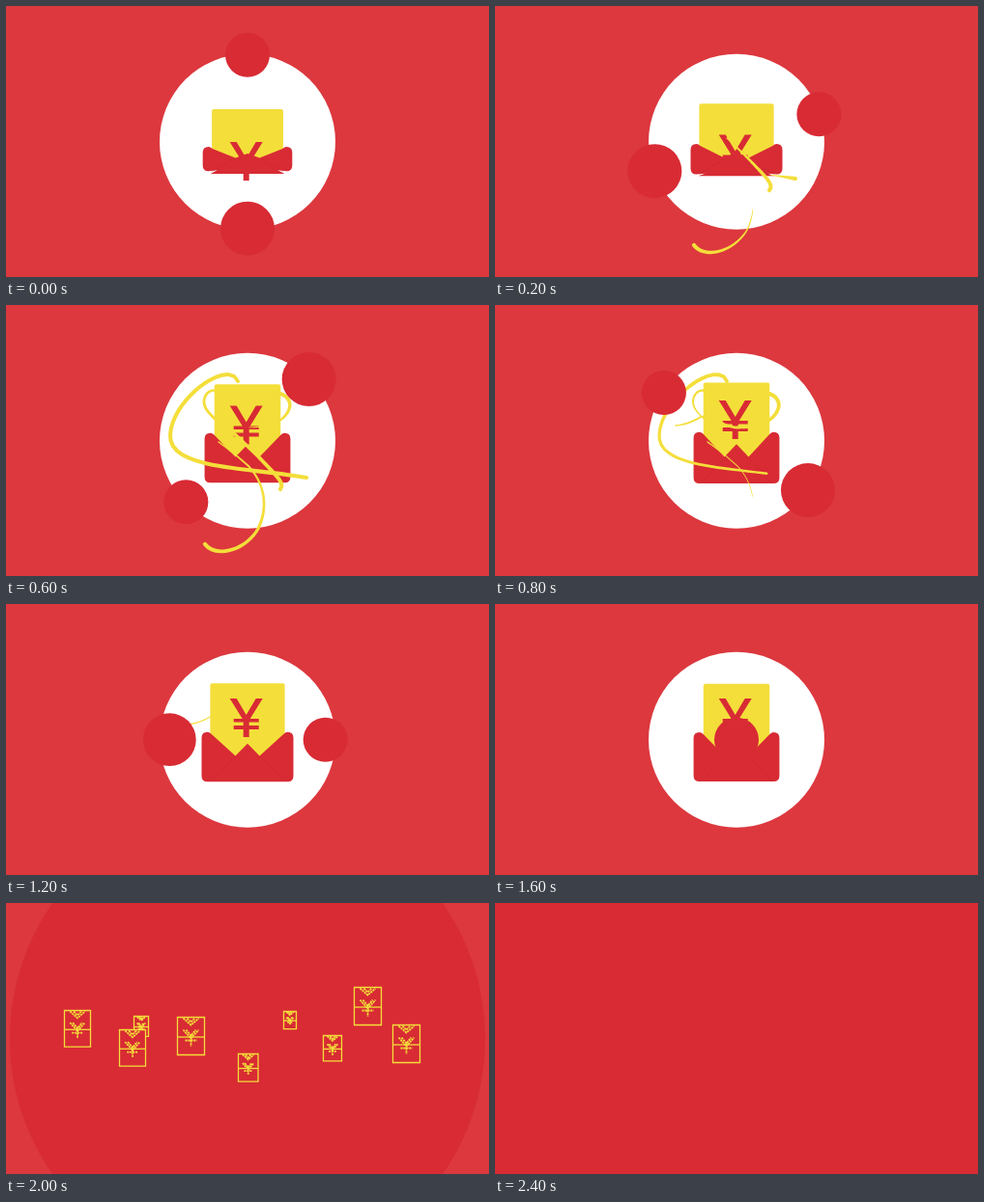
An HTML page that plays this animation: 500 by 281 pixels, repeating every 2500 ms.

```html
<!DOCTYPE html>
<html lang="en">
<head>
<meta charset="utf-8">
<title>Red packet</title>
<style>
  html, body { margin: 0; width: 100%; height: 100%; overflow: hidden; background: #dc383e; }
  svg { display: block; }
  .red { fill: #d82b34; }
  .gold { fill: #f4de3a; }
  .crease { fill: none; stroke: #bd252e; stroke-width: .6; opacity: .55; }
  .packet path { fill: none; stroke: #f4de3a; stroke-width: 1.3; vector-effect: non-scaling-stroke; }
  .packet .case { fill: #d82b34; }
  .packet .print { stroke-width: 1.8; stroke-dasharray: 2.2 .7; }
</style>
</head>
<body>
<svg width="500" height="281" viewBox="0 0 500 281">
  <circle cx="250" cy="140.7" r="91" fill="#fff"/>
  <rect id="card" class="gold" rx="2"/>
  <path id="body" class="red"/>
  <path id="crease" class="crease"/>
  <path id="yen" class="red" d="M-17 0h7L0 17 10 0h7L4 21H13V24.5H3V28H13V32H3V40H-3V32H-13V28H-3V24.5H-13V21H-4Z"/>
  <g id="ribbons" class="gold"></g>
  <circle id="big" class="red"/>
  <circle id="small" class="red"/>
  <g id="packets"></g>
</svg>
<script>
const LOOP = 2500, STEP = 100, CX = 250, CY = 140.7;
const NS = 'http://www.w3.org/2000/svg';
const $ = id => document.getElementById(id);
const clamp = v => Math.min(1, Math.max(0, v));
const ramp = (t, from, to) => clamp((t - from) / (to - from));
const smooth = k => k * k * (3 - 2 * k);

function set(el, attrs) {
  for (const key in attrs) el.setAttribute(key, attrs[key]);
}

function make(tag, attrs, parent) {
  const el = document.createElementNS(NS, tag);
  set(el, attrs);
  if (parent) parent.append(el);
  return el;
}

function drawEnvelope(t) {
  const decay = Math.exp(-((t / 600) ** 2));
  const spring = decay * Math.cos(t * .0027);
  const pulse = Math.cos((t - 1200) / 1000 * 2 * Math.PI);

  const half = 45.8 + 1.7 * pulse, l = CX - half, r = CX + half;
  const top = 133 + 13 * spring, notch = 157.5, peak = 145 + 8 * spring;
  const base = 184 - 10 * spring, lift = 4 * Math.max(0, spring - .3);
  const side = base - lift, pinch = side - lift / 3;
  set($('body'), { d: `M${l} ${top + 6}Q${l} ${top} ${l + 6} ${top}Q${l + 8} ${top} ${l + 10} ${top + 2}
    L${CX - 12.5} ${notch}L${CX} ${peak}L${CX + 12.5} ${notch}L${r - 10} ${top + 2}
    Q${r - 8} ${top} ${r - 6} ${top}Q${r} ${top} ${r} ${top + 6}V${side - 6}Q${r} ${side} ${r - 6} ${side}
    L${r - 15} ${pinch}L${r - 8} ${base}H${l + 8}L${l + 15} ${pinch}L${l + 6} ${side}Q${l} ${side} ${l} ${side - 6}Z` });
  set($('crease'), {
    d: `M${CX - 12.5} ${notch + 1}L${l + 9} ${base - 2}M${CX + 12.5} ${notch + 1}L${r - 9} ${base - 2}`
  });

  const cardHalf = 36.2 + 2.4 * pulse, cardTop = 82.8 + 24.2 * spring;
  set($('card'), { x: CX - cardHalf, y: cardTop, width: cardHalf * 2, height: notch + 1 - cardTop });
  set($('yen'), { transform: `translate(248.7 ${cardTop + 15.3 + 18.7 * decay})` });
}

const ribbons = [
  { begin: 160, width: 4, d: 'M311 179C275 173 250 172 215 166C185 160 170 151 170 136C170 108 205 74 228 72Q238 72 240 79' },
  { begin: 0, width: 2.6, d: 'M284 191C289 185 281 178 261 157L236 133C218 120 204 110 205 99C206 91 212 87 218 89' },
  { begin: 0, width: 1.3, d: 'M206 248C216 262 247 256 261 232C273 207 266 183 251 167Q238 155 220 142' },
  { begin: 400, width: 1.4, d: 'M284 92C291 94 296 101 293 108C288 122 270 127 250 127C232 126 228 112 213 116Q200 124 187 125' }
].map(ribbon => {
  const guide = make('path', { d: ribbon.d });
  return { ...ribbon, guide, size: guide.getTotalLength(), el: make('path', {}, $('ribbons')) };
});

// A tapered stroke whose head runs along the guide and whose tail follows
function drawRibbon({ guide, size, el, begin, width }, t) {
  const age = t - begin, head = ramp(age, 0, 400), tail = ramp(age, 600, 950);
  if (head - tail < .01) return set(el, { d: '' });
  const tailWidth = .6 + 3.6 * (1 - tail) ** 6, headWidth = width * head;
  const left = [], right = [], count = 40;
  const point = s => guide.getPointAtLength(size * clamp(s / size));
  for (let i = 0; i <= count; i++) {
    const k = i / count, s = size * (tail + (head - tail) * k);
    const p = point(s), a = point(s - .5), b = point(s + .5);
    const dir = Math.atan2(b.y - a.y, b.x - a.x), w = (tailWidth + (headWidth - tailWidth) * k) / 2;
    const dx = -Math.sin(dir) * w, dy = Math.cos(dir) * w;
    left.push(`${p.x + dx} ${p.y + dy}`);
    right.unshift(`${p.x - dx} ${p.y - dy}`);
  }
  const arc = w => `A${w / 2} ${w / 2} 0 0 0 `;
  set(el, { d: `M${left.join('L')}${arc(headWidth)}${right.join('L')}${arc(tailWidth)}${left[0]}Z` });
}

// Two dots circle the envelope, meet in the middle and flood the stage
function drawDots(t) {
  const meet = smooth(ramp(t, 1100, 1600)), orbit = 90 * (1 - meet);
  const flood = Math.max(0, t - 1600) / 400;
  const dot = (id, from, sway, r) => {
    const a = (from + t * .375 - sway * Math.sin(t / 600 * Math.PI)) * Math.PI / 180;
    set($(id), { cx: CX + Math.cos(a) * orbit, cy: CY + Math.sin(a) * orbit, r });
  };
  dot('small', -90, 4, 23 + 223 * flood ** 1.4);
  dot('big', 90, 5.5, 28 - 6 * meet);
}

// x, y, width
const packets = [
  [60, 111, 27], [132, 117, 15], [117, 131, 27], [177, 118, 28], [240, 156, 20.5],
  [287, 112, 13], [328, 137, 19], [360, 87, 28], [400, 126, 28]
].map(([x, y, w]) => {
  const el = make('g', { class: 'packet' }, $('packets'));
  make('path', { class: 'case', d: 'M0 0H28V39H0Z' }, el);
  make('path', { d: 'M0 20.5H28' }, el);
  make('path', { class: 'print', d: 'M6 1L14 8L22 1M10 1L14 5L18 1M6 13L14 22L22 13M9 13L14 19L19 13M14 18V30M8 24H20' }, el);
  return { el, x: x + .5, y: y + .5, scale: w / 28 };
});

function drawPackets(t) {
  const age = t - 2000, fall = .2 * age + .0001 * age * age;
  set($('packets'), { opacity: ramp(t, 1700, 1900) * ramp(t, 2400, 2100) });
  for (const { el, x, y, scale } of packets)
    set(el, { transform: `translate(${x} ${y + fall}) scale(${scale})` });
}

function draw(now) {
  const t = Math.floor(now % LOOP / STEP) * STEP;
  drawEnvelope(t);
  ribbons.forEach(ribbon => drawRibbon(ribbon, t));
  drawDots(t);
  drawPackets(t);
}

const start = performance.now();
function tick() {
  draw(performance.now() - start);
  requestAnimationFrame(tick);
}
tick();
</script>
</body>
</html>
```
